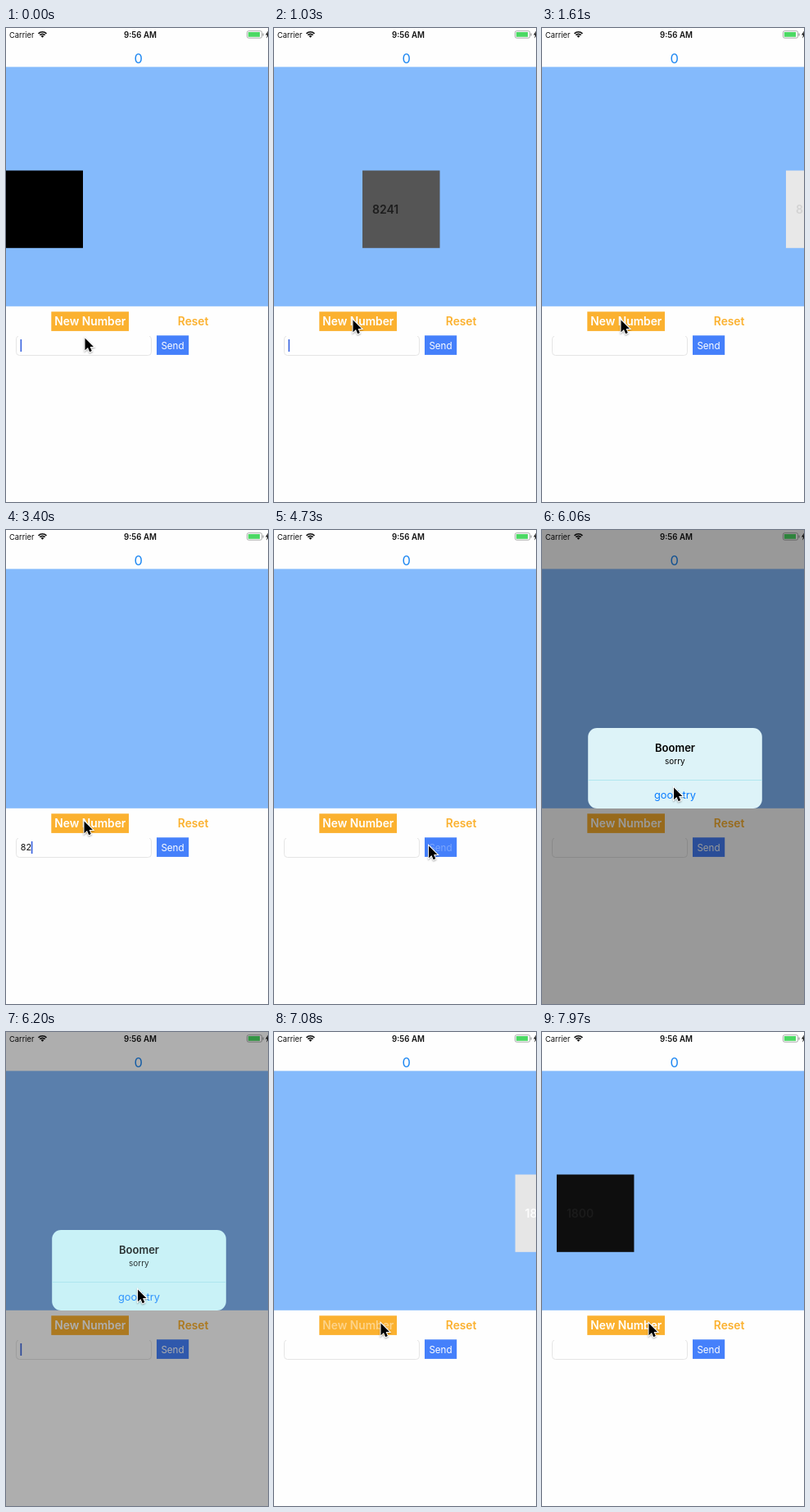
An HTML page with a canvas for the animation above (8000 ms loop, 320x577 px).

```html
<!DOCTYPE html>
<html lang="en">
<head>
<meta charset="utf-8">
<title>Number game</title>
<style>
html, body { margin: 0; height: 100%; overflow: hidden; background: #fefefe; }
canvas { display: block; width: 320px; height: 577px; }
</style>
</head>
<body>
<canvas id="stage" width="320" height="577"></canvas>
<script>
const LOOP = 8000;
const ctx = document.getElementById('stage').getContext('2d');
const ORANGE = '#fbb12f', BLUE = '#1d87f2';

const ramp = (t, a, b) => Math.min(1, Math.max(0, (t - a) / (b - a)));
const ease = u => u * u * (3 - 2 * u);
const mix = (a, b, u) => a + (b - a) * u;

// [time, x, y] of the pointer tip
const pointerPath = [
  [0, 96, 377], [290, 96, 377], [900, 96, 355], [1650, 96, 355], [1750, 95, 354],
  [4050, 95, 354], [4650, 188.5, 384], [5150, 188.5, 384], [5900, 160.5, 313],
  [6250, 160.5, 313], [6780, 130, 354], [8000, 130, 354]
];

function box(x, y, w, h, color) {
  ctx.fillStyle = color;
  ctx.fillRect(x, y, w, h);
}

function text(str, x, y, size, color, weight = 400, align = 'center', alpha = 1) {
  ctx.save();
  ctx.globalAlpha *= alpha;
  ctx.font = `${weight} ${size}px Inter, Roboto, sans-serif`;
  ctx.textAlign = align;
  ctx.fillStyle = color;
  ctx.fillText(str, x, y);
  ctx.restore();
}

function statusBar() {
  text('Carrier', 4, 11.5, 9.3, '#111', 400, 'left');
  text('9:56 AM', 164, 11.5, 9.7, '#111', 600);
  ctx.strokeStyle = ctx.fillStyle = '#111';
  ctx.lineWidth = 1.6;
  for (const r of [4.4, 7]) {
    ctx.beginPath();
    ctx.arc(44.5, 11.8, r, -Math.PI * 0.75, -Math.PI * 0.25);
    ctx.stroke();
  }
  ctx.beginPath();
  ctx.moveTo(44.5, 11.8);
  ctx.arc(44.5, 11.8, 2.6, -Math.PI * 0.75, -Math.PI * 0.25);
  ctx.fill();

  ctx.strokeStyle = '#999';
  ctx.lineWidth = 0.8;
  ctx.beginPath();
  ctx.roundRect(294.4, 3.6, 18.2, 8.6, 2);
  ctx.stroke();
  box(295.8, 5, 14.2, 5.8, '#4cd964');
  box(313.4, 6.5, 1.2, 3, '#999');
  ctx.fillStyle = '#111';
  ctx.fill(new Path2D('M320 3.5L317 8.6H319.2L318 12.5L322 7.3H319.6Z'));
}

function square(t) {
  const entering = t > 5000;
  const p = entering ? ease(ramp(t, 6819, 8165)) : 1 - ease(ramp(t, 512, 1858));
  if (p === 0) return;
  const x = mix(327, -0.5, p);
  const gray = Math.round(255 * (1 - p));
  box(x, 173.5, 94.5, 94.3, `rgb(${gray},${gray},${gray})`);
  if (entering) text('1800', x + 12, 226, 14, '#fff', 600, 'left', 1 - p);
  else text('8241', x + 12, 226, 14, '#000', 600, 'left', p);
}

function caretAlpha(t) {
  if (t > 2780 && t < 4300) return 1;
  if (t > 4700 && t < 6100) return 0;
  const origin = t < 4700 ? -200 : 6150;
  const u = (t - origin) % 1050;
  return u < 550 ? 1 - ramp(u, 440, 550) : ramp(u, 970, 1050);
}

function field(t) {
  ctx.strokeStyle = '#e3e3e3';
  ctx.lineWidth = 0.9;
  ctx.stroke(new Path2D('M15 375.3Q12.5 375.5 12.5 379V394.5Q12.5 398.5 16.5 398.5H173.5Q177.5 398.5 177.5 394.5V379Q177.5 375.5 175 375.3'));
  const typed = t < 4700 ? '8214'.slice(0, [2950, 3390, 3680, 3830].filter(k => t >= k).length) : '';
  text(typed, 17.8, 390.3, 10.8, '#111', 400, 'left');
  const x = 17.5 + ctx.measureText('').width + typedWidth(typed);
  ctx.globalAlpha = caretAlpha(t);
  box(x, 379, 1.7, 15, '#3f68e0');
  ctx.globalAlpha = 1;
}

function typedWidth(str) {
  ctx.font = '400 10.8px Inter, Roboto, sans-serif';
  return ctx.measureText(str).width;
}

// label opacity while a button is pressed and released
const press = (t, down, up) => t < down ? 1 : mix(0.3, 1, ramp(t, up, up + 320));

function controls(t) {
  box(55.3, 345.3, 94.7, 23.6, ORANGE);
  text('New Number', 102.8, 361.8, 13.8, '#fff', 600, 'center', press(t, 6800, 7020));
  text('Reset', 228.6, 361.8, 13.8, ORANGE, 600);
  field(t);
  box(184, 374.3, 39.2, 23.6, '#4580fb');
  text('Send', 203.5, 390.5, 11.6, '#fff', 400, 'center', press(t, 4680, 4930));
}

function alertBox(t) {
  if (t < 5010 || t > 6550) return;
  const k = 1 - ramp(t, 6110, 6550);
  box(0, 0, 320, 577, `rgba(0,0,0,${0.4 * k})`);
  const red = Math.round(mix(202, 221, ramp(k, 0.8, 1)));
  ctx.globalAlpha = Math.min(1, k * 1.25);
  ctx.fillStyle = `rgb(${red},243,248)`;
  ctx.beginPath();
  ctx.roundRect(56.2, 241, 212.6, 98, 11);
  ctx.fill();
  box(56.2, 304, 212.6, 0.8, '#a6e4ee');
  ctx.globalAlpha = k;
  text('Boomer', 162.5, 269.8, 13, '#000', 600);
  text('sorry', 162.3, 285.3, 10, '#000');
  text('good try', 162.5, 326.8, 12.8, '#087cff');
  ctx.globalAlpha = 1;
}

function pointer(t) {
  const i = pointerPath.findIndex(k => k[0] > t);
  const [t0, x0, y0] = pointerPath[i - 1], [t1, x1, y1] = pointerPath[i];
  const u = ease(ramp(t, t0, t1));
  ctx.save();
  ctx.translate(mix(x0, x1, u), mix(y0, y1, u));
  const arrow = new Path2D('M.5 .5V15.2L4 12L6.2 17.2L8.8 16.1L6.6 11H11Z');
  ctx.shadowColor = 'rgba(0,0,0,.35)';
  ctx.shadowBlur = 2;
  ctx.shadowOffsetY = 1;
  ctx.lineWidth = 2;
  ctx.strokeStyle = '#fff';
  ctx.stroke(arrow);
  ctx.shadowColor = 'transparent';
  ctx.fillStyle = '#000';
  ctx.fill(arrow);
  ctx.restore();
}

function draw(now) {
  const t = now % LOOP;
  box(0, 0, 320, 577, '#fefefe');
  statusBar();
  text('0', 161.8, 43, 16.5, BLUE);
  box(0, 47.4, 320, 291.4, '#84bafc');
  square(t);
  controls(t);
  alertBox(t);
  pointer(t);
  requestAnimationFrame(() => draw(performance.now()));
}
draw(performance.now());
</script>
</body>
</html>
```
